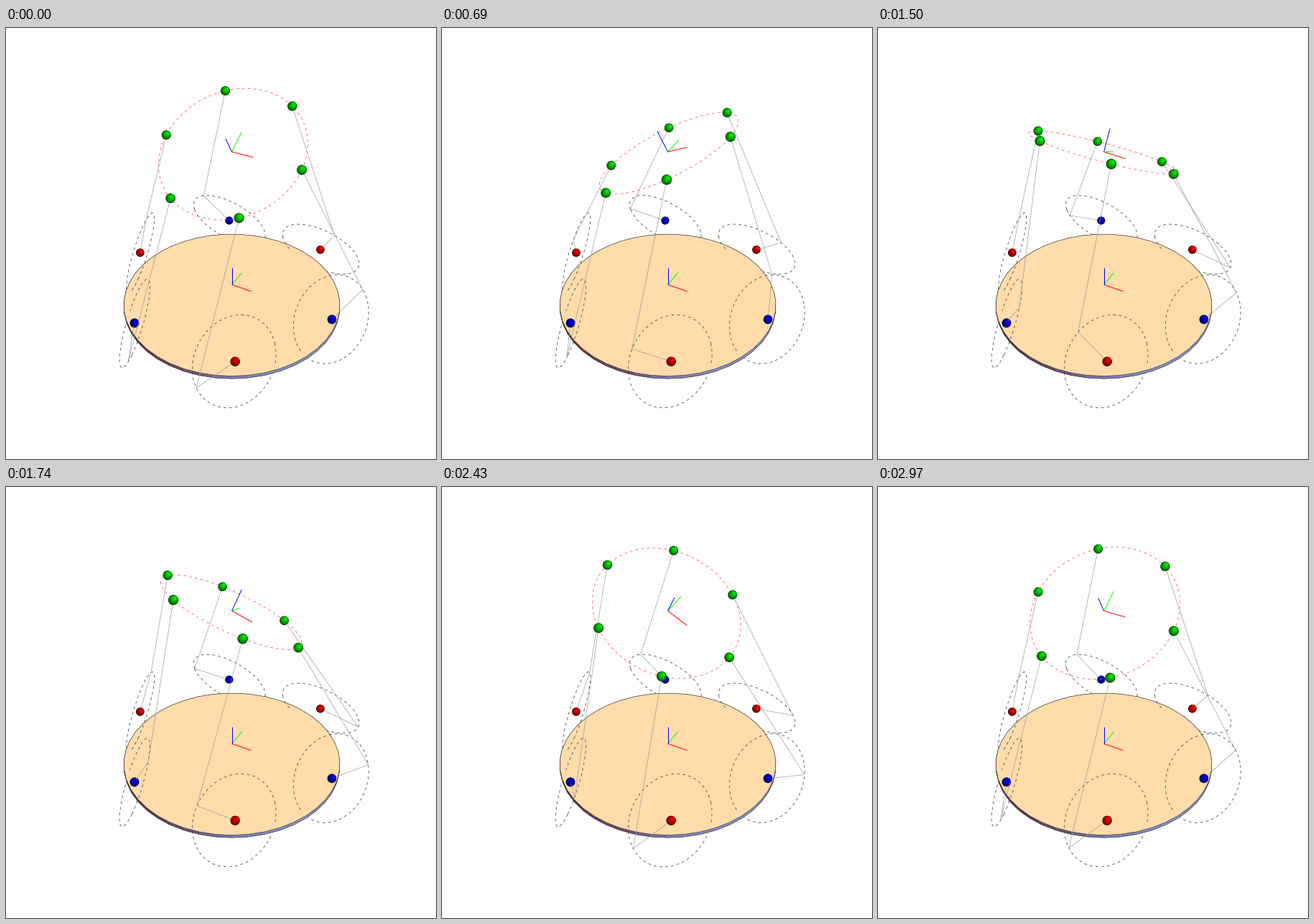
A matplotlib script that plays this animation: 599 by 600 pixels, repeating every 3 s.

```python
import numpy as np
import matplotlib.pyplot as plt
from matplotlib.animation import FuncAnimation

W, H, DPI = 599, 600, 64
FRAMES, STEP = 100, 30
PT = 72 / DPI

# Geometry in units of the base radius
ARM, ROD = 0.4, 1.45
PLAT_R, PLAT_Z = 0.64, 1.433
AXIS, BALL = 0.2, 0.04
TOP, BOTTOM = -0.17, -0.20
LEAN, SWAY = np.pi / 8, 0.5

# Perspective camera
X0, Y0, SCALE, DIST, LIFT = 314.6, 272.7, 151.6, 8.832, 0.558
TO_EYE = np.array([1.3, -2.4, 2.0])
TO_EYE /= np.linalg.norm(TO_EYE)
RIGHT = np.array([2.4, 1.3, 0.0]) / np.hypot(2.4, 1.3)
UP = np.cross(TO_EYE, RIGHT)
EYE = UP * LIFT + TO_EYE * DIST

RED, GREEN, BLUE = (0.96, 0, 0), (0, 0.92, 0), (0, 0, 0.92)
INK, GREY = "#333333", "#929292"


def project(p):
    """World points -> screen x, y, depth towards the eye, local scale."""
    depth = p @ TO_EYE
    k = SCALE * DIST / (DIST - depth)
    return X0 + k * (p @ RIGHT), Y0 - k * (p @ UP - LIFT), depth, k


def polar(a, r=1.0, z=0.0):
    a = np.asarray(a, float)
    return np.stack([r * np.cos(a), r * np.sin(a), z + 0 * a], -1)


def segment(a, b, n=260):
    return a + np.linspace(0, 1, n)[:, None] * (b - a)


def behind_base(p):
    hidden = np.zeros(len(p), bool)
    for level in (TOP, BOTTOM):
        t = (level - p[:, 2]) / (EYE[2] - p[:, 2])
        q = p + t[:, None] * (EYE - p)
        hidden |= (t > 0) & (np.hypot(q[:, 0], q[:, 1]) < 1)
    return hidden


def behind_balls(p, balls):
    x, y, depth, _ = project(p)
    bx, by, bd, bk = project(balls)
    off = np.hypot(x[:, None] - bx, y[:, None] - by) / bk
    front = bd + np.sqrt(np.clip(BALL**2 - off**2, 0, None))
    return ((off < BALL) & (depth[:, None] < front)).any(1)


def gaps(x, y, on=4.0, off=4.0):
    s = np.concatenate([[0], np.cumsum(np.hypot(np.diff(x), np.diff(y)))])
    return s % (on + off) > on


def trace(p, balls=None, dashed=False):
    """Screen path of a polyline with its unseen parts cut out."""
    x, y, _, _ = project(p)
    cut = behind_base(p)
    if balls is not None:
        cut |= behind_balls(p, balls)
    if dashed:
        cut |= gaps(x, y)
    return np.where(cut, np.nan, x), np.where(cut, np.nan, y)


def tilt(a, b):
    ca, sa, cb, sb = np.cos(a), np.sin(a), np.cos(b), np.sin(b)
    return np.array([[cb, sb * sa, sb * ca],
                     [0, ca, -sa],
                     [-sb, cb * sa, cb * ca]])


fig = plt.figure(figsize=(W / DPI, H / DPI), dpi=DPI, facecolor="white")
ax = fig.add_axes([0, 0, 1, 1])
ax.set(xlim=(0, W), ylim=(H, 0))
ax.axis("off")


def line(color, width, z):
    return ax.plot([], [], color=color, lw=width * PT, zorder=z,
                   solid_capstyle="butt")[0]


def draw_base():
    eye_az = np.arctan2(TO_EYE[1], TO_EYE[0])
    rel = np.radians(np.linspace(-96, 96, 25))
    stops = [-90, -45, -20, 0, 30, 90]
    tones = np.array([[45, 15, 20], [98, 50, 72], [112, 78, 118],
                      [128, 122, 180], [134, 146, 208], [140, 160, 222]]) / 255
    xt, yt, _, _ = project(polar(eye_az + rel, z=TOP))
    xb, yb, _, _ = project(polar(eye_az + rel, z=BOTTOM))
    for i in range(len(rel) - 1):
        mid = np.degrees(rel[i:i + 2].mean())
        c = [np.interp(mid, stops, tones[:, j]) for j in range(3)]
        ax.fill([xt[i], xt[i + 1], xb[i + 1], xb[i]],
                [yt[i], yt[i + 1], yb[i + 1], yb[i]],
                fc=c, ec=c, lw=0.3, zorder=1)
    ax.plot(xb, yb, color=INK, lw=0.7 * PT, zorder=2)
    rim_az = eye_az + np.radians(np.arange(0, 361, 8))
    x, y, _, _ = project(polar(rim_az, z=TOP))
    ax.fill(x, y, fc="#ffdcaa", ec=INK, lw=0.7 * PT, zorder=2)


sixths = np.radians(np.arange(-60, 300, 60))
motors = polar(sixths)
sides = np.array([1, -1] * 3)
facing = sixths + sides * np.radians(30)
along = np.stack([-np.sin(facing), np.cos(facing), 0 * facing], -1)
rise = polar(facing, -np.sin(LEAN), np.cos(LEAN))
ring = np.linspace(0, 2 * np.pi, 1600)

draw_base()
for m, e1, e2 in zip(motors, along, rise):
    loop = m + ARM * (np.cos(ring)[:, None] * e1 + np.sin(ring)[:, None] * e2)
    line(INK, 0.75, 3).set_data(*trace(loop, dashed=True))
for e, c in zip(np.eye(3), ("red", "lime", "blue")):
    line(c, 1.0, 4).set_data(*trace(segment(np.zeros(3), AXIS * e)))

# Shaded balls: nested discs drifting towards the light
LAYERS = np.linspace(0, 1, 12)
tints = np.array([RED, BLUE] * 3 + [GREEN] * 6)
shade = (0.25 + 0.75 * LAYERS**0.6)[:, None]
layer_rgb = tints[:, None] * shade
spheres = ax.scatter(np.zeros(144), np.zeros(144), s=1, linewidths=0, zorder=5)

rim = line("#ff4545", 0.75, 6)
rods = [line(GREY, 0.65, 6) for _ in motors]
arms = [line(GREY, 0.65, 6) for _ in motors]
axes = [line(c, 1.0, 7) for c in ("red", "lime", "blue")]


def knee(m, e1, e2, side, joint):
    """Arm end on its circle, one rod length away from the joint."""
    d = joint - m
    a, b = d @ e1, d @ e2
    reach = (d @ d + ARM**2 - ROD**2) / (2 * ARM)
    bend = np.arccos(np.clip(reach / np.hypot(a, b), -1, 1))
    t = np.arctan2(b, a) + side * bend
    return m + ARM * (np.cos(t) * e1 + np.sin(t) * e2)


def place_spheres(balls):
    x, y, depth, k = project(balls)
    order = np.argsort(depth)
    x, y, r = x[order, None], y[order, None], (k * BALL)[order, None]
    px = x + 0.36 * r * LAYERS
    py = y - 0.40 * r * LAYERS
    size = 2 * r * (1 - 0.8 * LAYERS) * PT
    spheres.set_offsets(np.column_stack([px.ravel(), py.ravel()]))
    spheres.set_sizes(size.ravel()**2)
    spheres.set_facecolors(layer_rgb[order].reshape(-1, 3))


def update(i):
    phase = 2 * np.pi * (i + 1) / FRAMES
    turn = tilt(SWAY * np.cos(phase), -SWAY * np.sin(phase))
    center = np.array([0, 0, PLAT_Z])
    joints = center + polar(sixths, PLAT_R) @ turn.T
    balls = np.vstack([motors, joints])

    place_spheres(balls)
    rim.set_data(*trace(center + polar(ring, PLAT_R) @ turn.T, balls, True))
    for j, (m, joint) in enumerate(zip(motors, joints)):
        elbow = knee(m, along[j], rise[j], sides[j], joint)
        arms[j].set_data(*trace(segment(m, elbow), balls))
        rods[j].set_data(*trace(segment(elbow, joint), balls))
    for art, e in zip(axes, turn.T):
        art.set_data(*trace(segment(center, center + AXIS * e), balls))
    return [spheres, rim, *rods, *arms, *axes]


anim = FuncAnimation(fig, update, frames=FRAMES, interval=STEP, repeat=True,
                     repeat_delay=0, blit=False)
plt.show()
```
